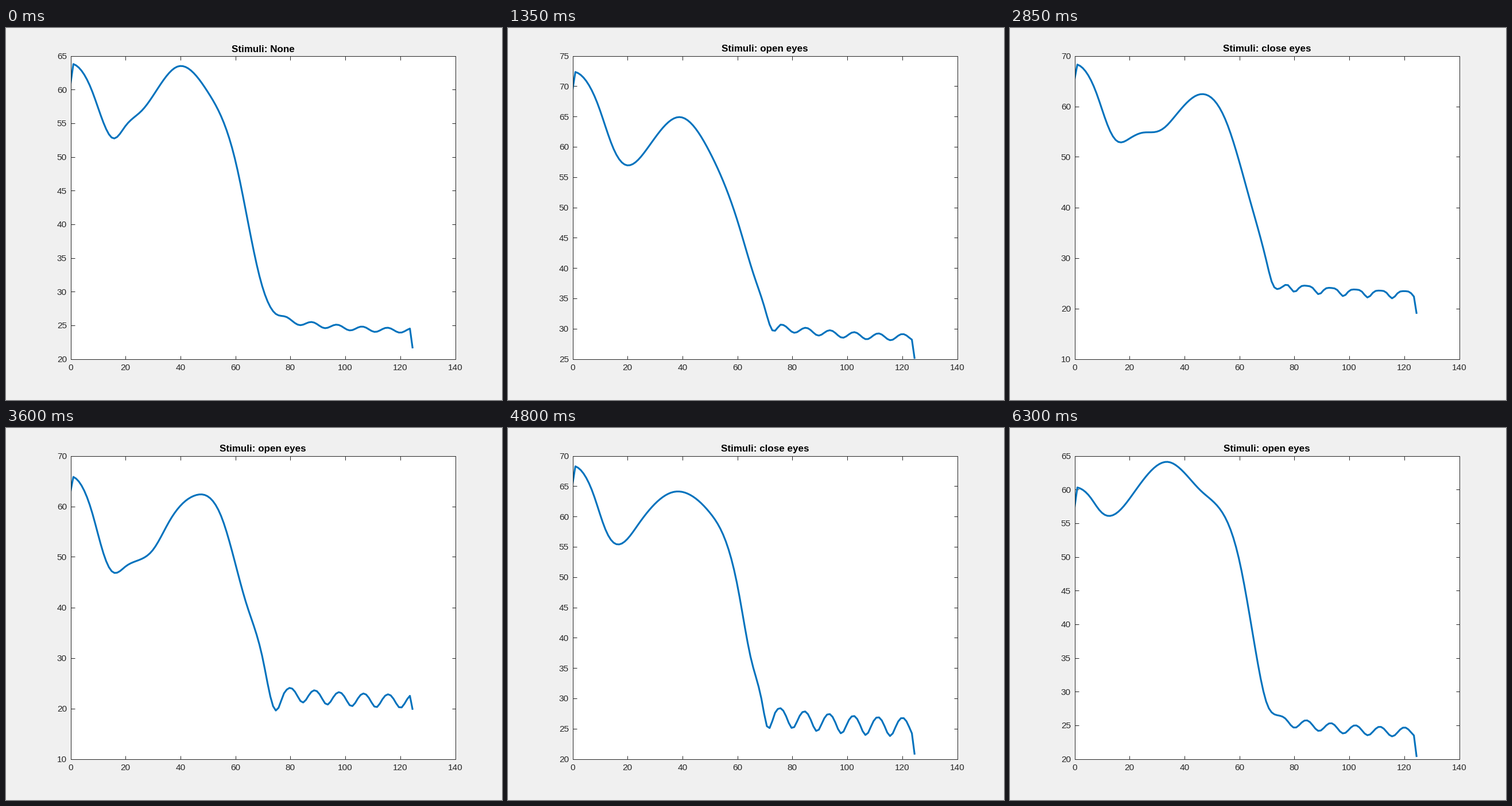
A matplotlib script that plays this animation: 864x648 px, repeating every 6450 ms.

```python
import numpy as np
import matplotlib.pyplot as plt
from matplotlib.animation import FuncAnimation

W, H, DPI = 864, 648, 100
FRAMES, STEP_MS = 43, 150
LEFT, RIGHT, TOP, BOTTOM = 112.5, 782.5, 48.5, 576.5
FREQ = np.arange(126) * 250 / 251
INK = "#262626"


def pt(px):
    return px * 72 / DPI


def spline(x, y, at):
    """Cubic spline, flat at its first point and natural at its last."""
    n, h = len(x), np.diff(x)
    slope = np.diff(y) / h
    a, rhs = np.eye(n), np.zeros(n)
    a[0, :2] = 2 * h[0], h[0]
    rhs[0] = 6 * slope[0]
    for i in range(1, n - 1):
        a[i, i - 1:i + 2] = h[i - 1], 2 * (h[i - 1] + h[i]), h[i]
        rhs[i] = 6 * (slope[i] - slope[i - 1])
    m = np.linalg.solve(a, rhs)
    k = np.clip(np.searchsorted(x, at) - 1, 0, n - 2)
    d = at - x[k]
    return (y[k] + d * (slope[k] - h[k] * (2 * m[k] + m[k + 1]) / 6)
            + d**2 * m[k] / 2 + d**3 * (m[k + 1] - m[k]) / (6 * h[k]))


def noise_floor(f, base, ripple, period):
    """Floor in dB; a negative ripple puts a dip at the highest frequency."""
    back = FREQ[-1] - f
    wave = 1 + ripple * np.cos(2 * np.pi * back / period)
    return base + 1.07 * (back / 40)**2 + 10 * np.log10(wave)


def spectrum(top, dip, *hump, base, ripple, period=8.9):
    """Power in dB: a slide from top to dip, a hump, then the rippled floor."""
    dip_f, dip_db = dip
    slide = [(t * dip_f, top + drop * (dip_db - top))
             for t, drop in ((0, 0), (0.5, 0.36), (0.8, 0.83))]
    x, y = np.array([*slide, dip, *hump], float).T
    tail = FREQ[FREQ >= x[-1] + 2.5]
    power = spline(np.append(x, tail),
                   np.append(y, noise_floor(tail, base, ripple, period)), FREQ)
    power[[0, -1]] -= 10 * np.log10(2)  # the end bins are not doubled
    return power


resting = spectrum(
    63.85, (15.5, 52.75), (20, 54.6), (26, 56.9), (39, 63.42), (50, 59.6),
    (60, 49.4), (69, 31.9), (75, 26.6), (78.5, 26.25),
    base=24.25, ripple=0.08, period=9.15)
open_first = spectrum(
    72.4, (18.5, 57.2), (27, 59.6), (39, 64.9), (50, 59.05), (60, 47.8),
    (66, 38.8), (70, 33.3), (73, 29.6),
    base=28.6, ripple=-0.122, period=8.77)
closed_first = spectrum(
    70.3, (16, 57.85), (24.7, 59.15), (33, 57.4), (45, 62.45), (55, 56.8),
    (65, 39.3), (70, 28.4), (72, 25.5),
    base=24.3, ripple=-0.498)
open_second = spectrum(
    65.95, (15.3, 47), (20, 48.1), (30, 51.4), (36, 57.1), (45.5, 62.2),
    (55, 57.8), (64, 40.7), (70, 29.7), (75, 19.6),
    base=21.62, ripple=0.296)
closed_second = spectrum(
    68.35, (15, 55.65), (24, 58.75), (36.8, 64.05), (50, 60.6), (60, 48.6),
    (65, 36.4), (69, 29.3), (71, 25.1),
    base=25.52, ripple=-0.338)
open_third = spectrum(
    69.97, (18.5, 48.6), (25, 50.9), (35, 55.3), (48, 61.85), (60, 51.5),
    (64, 40.5), (67, 26.6), (68, 23.1), (71, 23.05),
    base=24.2, ripple=-0.367)
open_last = spectrum(
    60.35, (11.5, 56.15), (21, 59.2), (34, 64.1), (46, 59.8), (51, 58),
    (60, 49.4), (66, 35.8), (70, 28.2), (73.2, 26.55),
    base=24.04, ripple=-0.156)

KEYS = {0: resting, 9: open_first, 15: closed_first, 24: open_second,
        32: closed_second, 38: open_third, 42: open_last}


def curve_at(frame):
    before = max(k for k in KEYS if k <= frame)
    after = min(k for k in KEYS if k >= frame)
    t = (frame - before) / max(after - before, 1)
    return (1 - t) * KEYS[before] + t * KEYS[after]


def stimulus_at(frame):
    if frame < 6:
        return "None"
    return ("open eyes", "close eyes")[(frame - 6) // 8 % 2]


def nice_ticks(y):
    """Steps of 5 while they span at most 50, otherwise steps of 10."""
    for step in (5, 10):
        low = np.floor(y.min() / step) * step
        high = np.ceil(y.max() / step) * step
        if high - low <= 50:
            break
    return np.arange(low, high + 1, step)


plt.rcParams["font.family"] = "Liberation Sans"
fig = plt.figure(figsize=(W / DPI, H / DPI), dpi=DPI, facecolor="#f0f0f0")
ax = fig.add_axes([LEFT / W, 1 - BOTTOM / H, (RIGHT - LEFT) / W, (BOTTOM - TOP) / H])
ax.set_xlim(0, 140)
ax.set_xticks(range(0, 141, 20))
ax.tick_params(direction="in", top=True, right=True, length=pt(6.5), width=pt(1),
               color=INK, labelcolor=INK, labelsize=pt(15.4))
ax.tick_params(axis="x", pad=pt(8.5))
ax.tick_params(axis="y", pad=pt(6.5))
for spine in ax.spines.values():
    spine.set(color=INK, linewidth=pt(1))

line, = ax.plot([], [], color="#0072bd", lw=pt(3.1), solid_capstyle="butt",
                solid_joinstyle="round")
title = fig.text((LEFT + RIGHT) / 2 / W, 1 - 41.5 / H, "", ha="center",
                 va="baseline", weight="bold", size=pt(17), color="black")


def draw(frame):
    y = curve_at(frame)
    ticks = nice_ticks(y)
    line.set_data(FREQ, y)
    ax.set_ylim(ticks[0], ticks[-1])
    ax.set_yticks(ticks)
    title.set_text("Stimuli: " + stimulus_at(frame))
    return line, title


anim = FuncAnimation(fig, draw, frames=FRAMES, interval=STEP_MS, repeat=True,
                     repeat_delay=0, blit=False)
plt.show()
```
